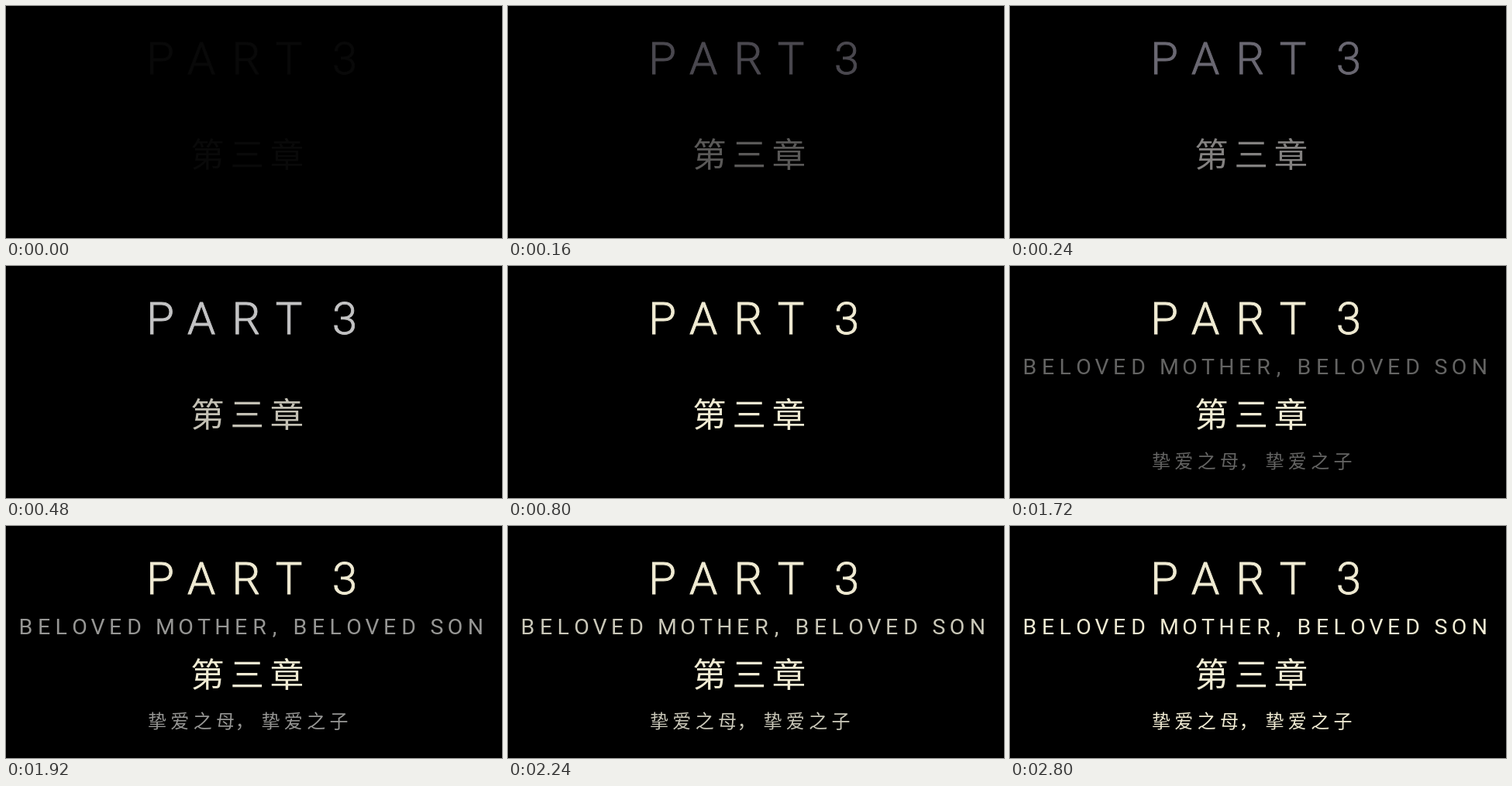
An HTML page that plays this animation: 640 px wide and 300 px high, repeating every 3640 ms.

```html
<!DOCTYPE html>
<html lang="zh-CN">
<head>
<meta charset="utf-8">
<title>Part 3</title>
<style>
  html, body { margin: 0; width: 100%; height: 100%; overflow: hidden; background: #000; }
  svg { display: block; width: 640px; height: 300px; }
  text { fill: currentColor; animation: 3640ms infinite; }
  .latin { font-family: Roboto, Inter, sans-serif; font-weight: 400; text-anchor: middle; }
  .han { font-family: "Noto Sans CJK SC", "Noto Sans CJK", sans-serif; font-weight: 500; }
  .part { font-size: 58px; font-weight: 300; stroke: currentColor; stroke-width: 0.9px; animation-name: part; }
  .chapter { font-size: 43.5px; letter-spacing: 7.7px; animation-name: chapter; }
  .title { font-size: 28.5px; animation-name: title; }
  .han.title { font-size: 24px; letter-spacing: 5.3px; }

  /* Fades advance in 40 ms, later 80 ms, ticks. */
  @keyframes part {
    0% { color: #090909; animation-timing-function: steps(6); }
    6.593% { color: #6a6872; animation-timing-function: steps(6); }
    13.186% { color: #c3c3c4; animation-timing-function: steps(8); }
    21.978%, 100% { color: #f0ebd3; }
  }
  @keyframes chapter {
    0% { color: #090909; animation-timing-function: steps(6); }
    6.593% { color: #838180; animation-timing-function: steps(6); }
    13.186% { color: #c3c0b4; animation-timing-function: steps(8); }
    21.978%, 100% { color: #f0ebd3; }
  }
  @keyframes title {
    0% { color: #000; animation-timing-function: step-end; }
    38.461% { color: #141414; animation-timing-function: steps(13); }
    52.747% { color: #969694; animation-timing-function: steps(7); }
    68.131%, 100% { color: #f0ebd3; }
  }
</style>
</head>
<body>
<svg viewBox="0 0 640 300">
  <text class="latin part" y="87.7" x="199 252 310 365 402 437">PART 3</text>
  <text class="latin title" y="139.5"
    x="25.5 49 71.3 95 118.5 141 165.5 185
       205.5 232 255.5 279.5 303 327 346.5 360
       379.5 403 425.3 449 472.5 495 519.5 538
       556 579.5 606">BELOVED MOTHER, BELOVED SON</text>
  <text class="han chapter" x="238.3" y="207.5">第三章</text>
  <text class="han title" x="183" y="260.5" dx="0 0 0 0 -4.5 4.5">挚爱之母，挚爱之子</text>
</svg>
</body>
</html>
```
